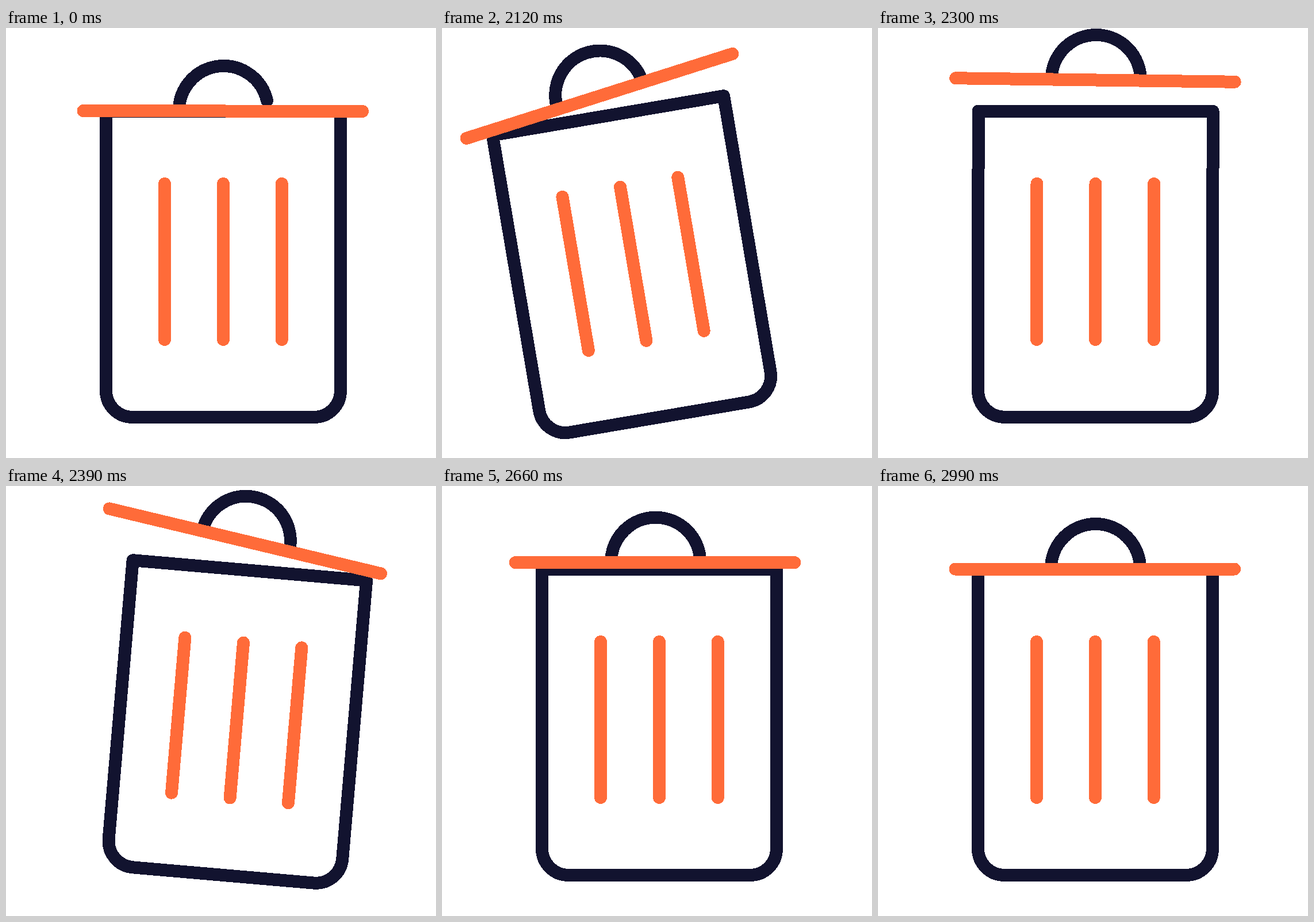
Write an HTML page that moves like this. It is 748 px wide and 748 px high and loops after 3.02 s.

```html
<!DOCTYPE html>
<html lang="en">
<head>
<meta charset="utf-8">
<title>Bin</title>
<style>
  html, body { margin: 0; width: 100%; height: 100%; overflow: hidden; background: #fff; }
  svg { display: block; width: 100vw; height: 100vh; shape-rendering: crispEdges; }
  path { fill: none; stroke-width: 22; stroke-linecap: round; stroke-linejoin: round; }
  .navy { stroke: #12132f; }
  .orange { stroke: #ff6b39; }
</style>
</head>
<body>
<svg viewBox="0 0 748 748">
  <g id="bin">
    <path class="navy" d="M174 144.8V631a46 46 0 0 0 46 46H536a46 46 0 0 0 46 -46V144.8Z"/>
    <path class="orange" d="M276 271V542M378 271V542M479.7 271V542"/>
    <g id="lid">
      <path id="handle" class="navy"/>
      <path class="orange" d="M134.5 144.5H620"/>
    </g>
  </g>
</svg>
<script>
const LOOP = 3020, START = 2030, STEP = 30;
const [bin, lid, handle] = ['bin', 'lid', 'handle'].map(id => document.getElementById(id));

function ease(from, to, n) {
  const u = Math.min(1, Math.max(0, (n - from) / (to - from)));
  return u * u * (3 - 2 * u);
}

// Rises from 0 to 1 at the peak and falls back to 0.
const bump = (from, peak, to, n) => ease(from, peak, n) - ease(peak, to, n);

// The bin rocks left, then right; the lid hops and follows a little later.
function pose(n) {
  return {
    tilt: 5 * bump(3.7, 12.3, 16.3, n) - 10 * bump(-2.4, 3.7, 12.3, n),
    lidTilt: 9 * bump(4.5, 12.8, 19, n) - 10 * bump(-0.7, 4.5, 12.8, n),
    lidX: -8.4 * bump(-1.5, 3, 9, n) - 18 * bump(9, 14, 26, n),
    lidY: -54 * (ease(-2, 6.2, n) - ease(9, 26, n))
  };
}

const REST = { tilt: 0, lidTilt: 0.1, lidX: 0, lidY: 0 };

function render(time) {
  const t = time % LOOP;
  const resting = t < START;
  const { tilt, lidTilt, lidX, lidY } = resting ? REST : pose(Math.floor((t - START) / STEP));
  bin.setAttribute('transform', `rotate(${tilt} 378 677)`);
  lid.setAttribute('transform', `translate(${lidX} ${lidY}) rotate(${lidTilt} 378 144.5)`);
  handle.setAttribute('d', `M301 143.5A77.5 77.5 0 0 1 ${resting ? '454 126' : '456 143.5'}`);
}

let origin;
function tick(now) {
  origin ??= now;
  render(now - origin);
  requestAnimationFrame(tick);
}
render(0);
requestAnimationFrame(tick);
</script>
</body>
</html>
```
